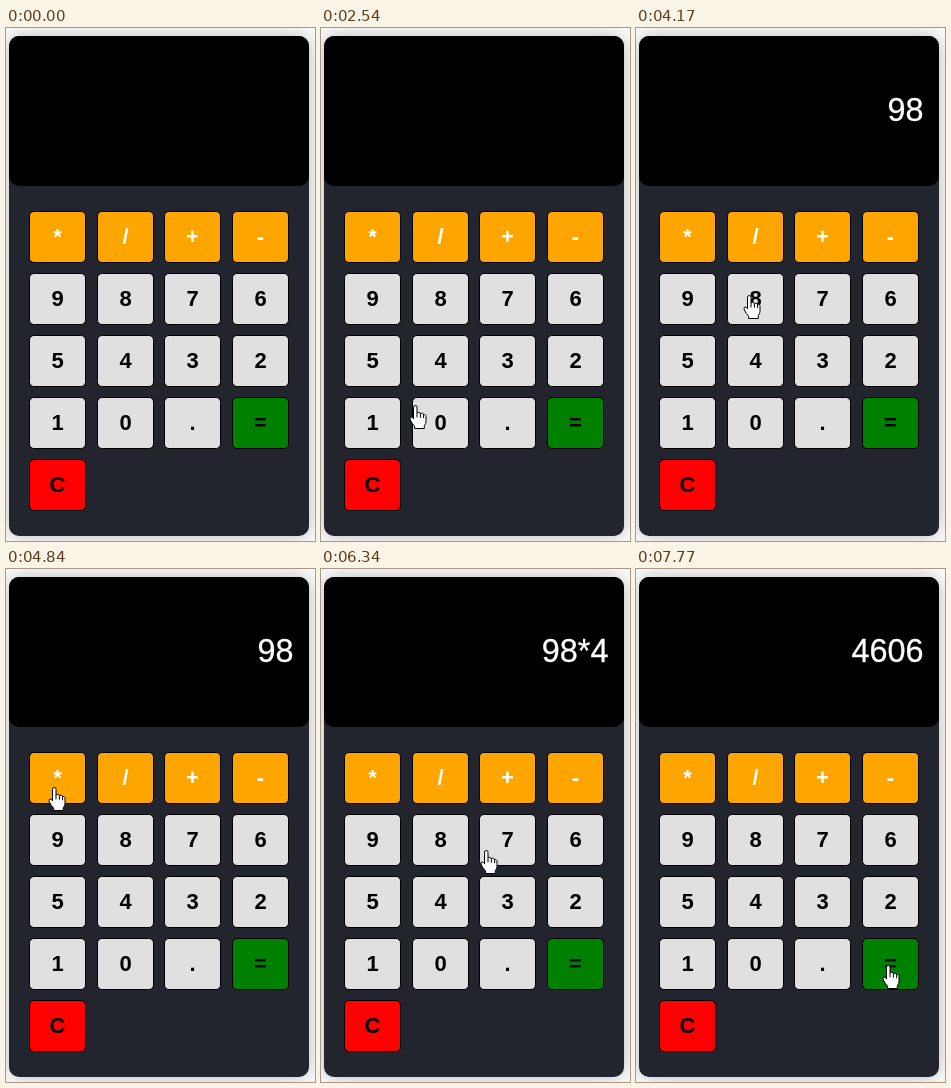
Animation, 309 px wide and 513 px high, one loop 8 s. Source, as an HTML page:

```html
<!DOCTYPE html>
<html lang="en">
<head>
<meta charset="utf-8">
<title>Calculator</title>
<style>
  html, body { margin: 0; width: 100%; height: 100%; overflow: hidden; background: #fff; }
  .calc {
    position: absolute; left: 3px; top: 8px; width: 300px; height: 500px;
    border-radius: 10px; background: #22252d; box-shadow: 0 0 20px rgba(0, 0, 0, .3);
  }
  svg { position: absolute; left: 0; top: 0; display: block; }
  text { font-family: "Liberation Sans", Arial, sans-serif; }
  .key { font-size: 22px; font-weight: bold; text-anchor: middle; }
  #display { font-size: 32.4px; fill: #fff; stroke: #fff; stroke-width: .3; text-anchor: end; }
  .cursor { fill: #fff; stroke: #000; stroke-linejoin: round; stroke-linecap: round; }
</style>
</head>
<body>
<div class="calc"></div>
<svg width="309" height="513" viewBox="0 0 309 513">
  <rect x="3" y="8" width="300" height="150" rx="10"/>
  <text id="display" x="287.5" y="93"></text>
  <g id="keys"></g>
  <g id="hand" class="cursor" stroke-width="1">
    <path d="M-1.5 13.5V2.2Q-1.5.5.3.5T2 2.2V8.2Q2.5 7.2 3.8 7.3T5.4 8.8Q6 8 7.2 8.2T8.6 9.8Q9.4 9.2 10.3 9.8T11 11.8V16.5Q11 18.5 9.3 20.7V23.5H-.4V21.2Q-3 18.6-4.6 15Q-5.4 13-4.5 12.2Q-3.2 11.4-1.5 13.5Z"/>
    <path d="M2 8.5V12M5.4 9V12.3M8.6 10V12.8" fill="none"/>
  </g>
  <path id="arrow" class="cursor" stroke-width="1" d="M.5.5V16.5L4.2 13L6.6 18.5L9 17.5L6.7 12.1H11.8Z"/>
</svg>
<script>
const LOOP = 8000, START = 1117, STEP = 67.8;
const CLICK_DELAY = 100, BOW = .12;
const KEY_W = 57, KEY_H = 52, PITCH_X = 67.7, PITCH_Y = 62;

const colors = { '=': '#008000', C: '#f00' };
const keys = [...'*/+-9876543210.=C'].map((label, i) => ({
  label,
  isOperator: i < 4,
  x: Math.round(23 + PITCH_X * (i % 4)),
  y: 183 + PITCH_Y * Math.floor(i / 4)
}));

// Where the pointer goes, and the key it clicks on arrival
const home = { x: 312, y: 516 };
const moves = [
  { start: 1040, end: 1180, x: 292, y: 498 },
  { start: 1180, end: 1250, ...home },
  { start: 1850, end: 2530, x: 94, y: 377 },
  { start: 2650, end: 3170, x: 53, y: 263, press: '9' },
  { start: 3480, end: 3980, x: 113, y: 267, press: '8' },
  { start: 4290, end: 4850, x: 48, y: 218, press: '*' },
  { start: 5110, end: 5800, x: 112, y: 320, press: '4' },
  { start: 5990, end: 6660, x: 171, y: 270, press: '7' },
  { start: 6770, end: 7530, x: 252, y: 396, press: '=' }
];

const $ = id => document.getElementById(id);
const display = $('display'), hand = $('hand'), arrow = $('arrow');

$('keys').innerHTML = keys.map(({ label, isOperator, x, y }) => {
  const fill = isOperator ? '#ffa500' : colors[label] || '#e0e0e0';
  const ink = isOperator ? '#fff' : '#000';
  return `<rect x="${x + .5}" y="${y + .5}" width="${KEY_W - 1}" height="${KEY_H - 1}" rx="4.5" fill="${fill}" stroke="#000"/>` +
    `<text class="key" x="${x + KEY_W / 2}" y="${y + 32.5}" fill="${ink}">${label}</text>`;
}).join('');

const easeOut = s => 1 - (1 - s) ** 2.6;

// Each move slows towards its end along a slightly bowed line
function pointerAt(t) {
  const i = moves.findLastIndex(m => m.start <= t);
  if (i < 0) return [home.x, home.y];
  const from = moves[i - 1] || home, to = moves[i];
  const e = easeOut(Math.min(1, (t - to.start) / (to.end - to.start)));
  const bend = BOW * 4 * e * (1 - e);
  const dx = to.x - from.x, dy = to.y - from.y;
  return [from.x + dx * e - dy * bend, from.y + dy * e + dx * bend].map(Math.round);
}

const product = text => String(text.split('*').reduce((a, b) => a * b));

function textAt(t) {
  return moves
    .filter(m => m.press && m.end + CLICK_DELAY <= t)
    .reduce((text, { press }) => press === '=' ? product(text) : text + press, '');
}

const overKey = (x, y) => keys.some(k =>
  x >= k.x && x < k.x + KEY_W && y >= k.y && y < k.y + KEY_H);

function place(node, pos, visible) {
  node.style.display = visible ? '' : 'none';
  node.setAttribute('transform', `translate(${pos})`);
}

function draw(time) {
  const t = START + Math.floor((time - START) / STEP) * STEP;
  const pos = pointerAt(Math.min(time, t));
  const isHand = overKey(...pos);
  place(hand, pos, isHand);
  place(arrow, pos, !isHand);
  display.textContent = textAt(t);
}

const origin = performance.now();
function tick() {
  draw((performance.now() - origin) % LOOP);
  requestAnimationFrame(tick);
}
tick();
</script>
</body>
</html>
```
